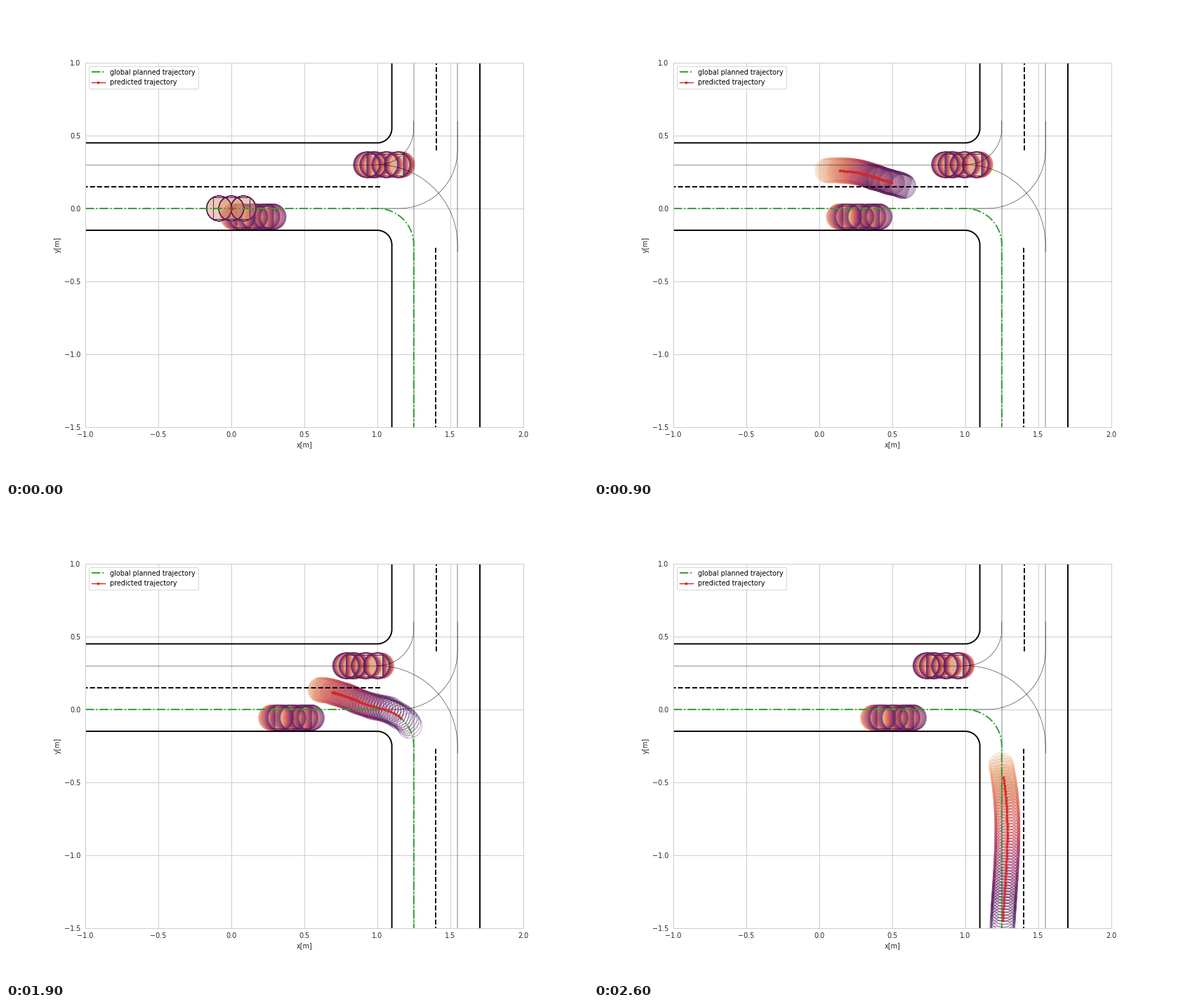
Recreate the animation shown at these times as a matplotlib script. Size 829 by 675 pixels, loop 2.7 s.

```python
import numpy as np
import matplotlib.pyplot as plt
from matplotlib.animation import FuncAnimation
from matplotlib.collections import PathCollection
from matplotlib.colors import LinearSegmentedColormap
from matplotlib.path import Path

W, H, DPI = 829, 675, 64
PT = 69 / DPI          # scale of all point sizes
FRAMES, INTERVAL = 27, 100
STATES = 50            # predicted states per vehicle
HORIZON = 4.9          # prediction length in frames
LENGTH, WIDTH = 0.25, 0.15
GREY = "0.15"

plt.rcParams.update({
    "font.family": "DejaVu Sans",
    "font.size": 10 * PT,
    "axes.linewidth": PT,
    "axes.edgecolor": "0.8",
    "axes.labelcolor": GREY,
    "axes.labelpad": 4 * PT,
    "axes.axisbelow": True,
    "grid.color": "0.8",
    "grid.linewidth": PT,
    "patch.linewidth": PT,
})

flare = LinearSegmentedColormap.from_list(
    "flare", ["#edb081", "#dd5e5d", "#9a3670", "#4b2362"])

# Key points of the ego path (time in frames, x, y): overtake, return, turn
KEYS = np.array([
    (1, -1, 0), (5, -0.43, 0.17), (7, -0.145, 0.25), (9, 0.14, 0.258),
    (13, 0.45, 0.192), (17, 0.62, 0.134), (21, 0.79, 0.088),
    (22.4, 0.9, 0.045), (24, 1.17, -0.068), (26, 1.26, -0.465),
    (32, 1.25, -1.67)])
KT, KP = KEYS[:, 0], KEYS[:, 1:]
KV = np.gradient(KP, KT, axis=0)


def ego_at(t):
    """Position and heading on the path (cubic Hermite)."""
    i = np.clip(np.searchsorted(KT, t, side="right") - 1, 0, len(KT) - 2)
    h = (KT[i + 1] - KT[i])[:, None]
    u = (t - KT[i])[:, None] / h
    p, q, v, w = KP[i], KP[i + 1], KV[i] * h, KV[i + 1] * h
    c, d = 3 * (q - p) - 2 * v - w, 2 * (p - q) + v + w
    vel = v + 2 * c * u + 3 * d * u * u
    return p + u * (v + u * (c + u * d)), np.arctan2(vel[:, 1], vel[:, 0])


def circle(x, r):
    unit = Path.unit_circle()
    return Path(unit.vertices * r + (x, 0), unit.codes)


def rectangle(length, width):
    square = Path.unit_rectangle()
    return Path((square.vertices - 0.5) * (length, width), square.codes)


def body(radius, lead=()):
    offsets = (-LENGTH / 3, 0, LENGTH / 3, *lead)
    return [circle(x, radius) for x in offsets] + [rectangle(LENGTH, WIDTH)]


def place(parts, points, angles):
    """Copies of the body parts at every state, first state lowest."""
    paths = []
    for point, a in zip(points, angles):
        rot = np.array([(np.cos(a), np.sin(a)), (-np.sin(a), np.cos(a))])
        paths += [Path(p.vertices @ rot + point, p.codes) for p in parts]
    return paths


def swarm(ax, parts, edge_alpha):
    """Collection whose colours run along the horizon; the fill fades fast."""
    edges, faces = [], []
    for k in range(STATES):
        rgb = flare(k / (STATES - 1))[:3]
        edges += [(*rgb, edge_alpha)] * len(parts)
        faces += [(*rgb, 0.2 * 0.7 ** k)] * (len(parts) - 1) + [(*rgb, 0)]
    coll = PathCollection([], facecolors=faces, edgecolors=edges,
                          linewidths=PT, zorder=1)
    ax.add_collection(coll, autolim=False)
    return coll


def arc(cx, cy, r, start, stop):
    a = np.radians(np.linspace(start, stop, 60))
    return list(zip(cx + r * np.cos(a), cy + r * np.sin(a)))


def line(ax, pts, width, color="black", style="-", **kw):
    x, y = zip(*pts)
    return ax.plot(x, y, style, color=color, lw=width * PT, **kw)[0]


fig = plt.figure(figsize=(W / DPI, H / DPI), dpi=DPI, facecolor="white")
ax = fig.add_subplot()
ax.set_aspect("equal")
ax.set(xlim=(-1, 2), ylim=(-1.5, 1), xlabel="x[m]", ylabel="y[m]")
ax.set_xticks(np.arange(-1, 2.1, 0.5))
ax.set_yticks(np.arange(-1.5, 1.1, 0.5))
ax.tick_params(length=0, pad=7 * PT, labelcolor=GREY)
ax.grid(True)

# Road borders
line(ax, [(-1, 0.45), *arc(1, 0.55, 0.1, -90, 0), (1.1, 1)], 2)
line(ax, [(-1, -0.15), *arc(1, -0.25, 0.1, 90, 0), (1.1, -1.5)], 2)
line(ax, [(1.703, 1), (1.703, -1.5)], 2)

# Lane separators
line(ax, [(1.02, 0.15), (-1, 0.15)], 2, style="--")
line(ax, [(1.403, 0.4), (1.403, 1)], 2, style="--")
line(ax, [(1.4, -0.27), (1.4, -1.5)], 2, style="--")

# Lane centres and turns
line(ax, [(-1, 0.3), (1, 0.3)], 0.5)
for x in (1.25, 1.55):
    line(ax, [(x, 1), (x, -1.5)], 0.5)
line(ax, [*arc(1, 0.55, 0.25, -90, 0), (1.25, 0.6)], 0.5)
line(ax, [*arc(1, -0.25, 0.55, 90, 0), (1.55, -0.3)], 0.5)
line(ax, [(1, 0), *arc(1.15, 0.4, 0.4, -90, 0), (1.55, 0.6)], 0.5)

line(ax, [(-1, 0), *arc(1, -0.25, 0.25, 90, 0), (1.25, -1.5)], 2,
     "tab:green", "-.", label="global planned trajectory")
predicted = line(ax, [(0, 0)], 1.5, "tab:red", marker=".",
                 markersize=6 * PT, label="predicted trajectory", zorder=3)
ax.legend(loc="upper left", labelcolor="black", edgecolor="0.8")

EGO = body(np.hypot(LENGTH / 6, WIDTH / 2))
OTHER = body(0.088, lead=(LENGTH / 3 + 0.043,))

# Start, speed per frame and heading of the other vehicles
OTHERS = [((0.095, -0.057), 0.01375, 0), ((1.087, 0.3), -0.0075, np.pi)]
other_sets = [swarm(ax, OTHER, 0.3) for _ in OTHERS]
ego_set = swarm(ax, EGO, 0.4)


def draw(frame):
    times = frame + np.linspace(0, HORIZON, STATES)
    for coll, ((x, y), speed, heading) in zip(other_sets, OTHERS):
        points = np.column_stack([x + speed * times, np.full(STATES, y)])
        coll.set_paths(place(OTHER, points, np.full(STATES, heading)))
    if frame == 0:  # standing still before the first plan
        points, angles = np.zeros((STATES, 2)), np.zeros(STATES)
    else:
        points, angles = ego_at(times)
    ego_set.set_paths(place(EGO, points, angles))
    predicted.set_data(points[:, 0], points[:, 1])
    return [*other_sets, ego_set, predicted]


anim = FuncAnimation(fig, draw, frames=FRAMES, interval=INTERVAL,
                     repeat=True, repeat_delay=0, blit=False)
plt.show()
```
